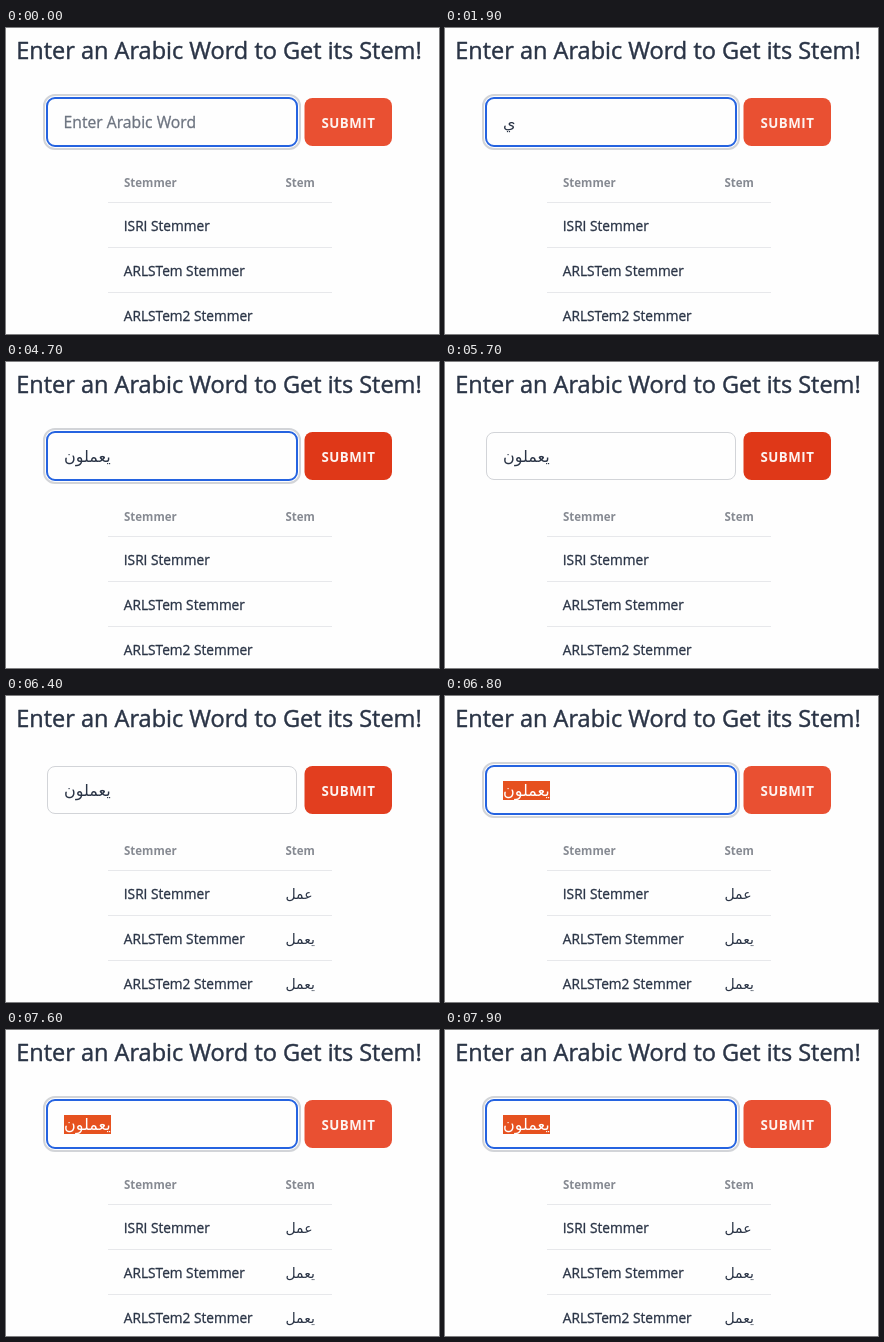
An HTML page with a canvas that plays this animation: 433x306 px, repeating every 8 s.

```html
<!DOCTYPE html>
<html lang="en">
<head>
<meta charset="utf-8">
<title>Arabic stemmer</title>
<style>
  html, body { margin: 0; width: 100%; height: 100%; overflow: hidden; background: #fefefe; }
  canvas { display: block; width: 433px; height: 306px; }
</style>
</head>
<body>
<canvas id="stage"></canvas>
<script>
const W = 433, H = 306, LOOP = 8000, STEP = 100;
const WORD = 'يعملون';
const LATIN = '"Open Sans", "Noto Sans", sans-serif';
const ARABIC = '"DejaVu Sans", sans-serif';
const INK = '#2a3446';

// Time of each keystroke and the number of letters typed by then
const TYPING = [[1900, 1], [2300, 2], [2600, 3], [3000, 4], [3200, 6]];
const HOVER_IN = 4400, BLUR = 5700, RESULTS = 6300, SELECT = 6800;

const ROWS = [
  ['ISRI Stemmer', 'عمل'],
  ['ARLSTem Stemmer', 'يعمل'],
  ['ARLSTem2 Stemmer', 'يعمل']
];

const canvas = document.getElementById('stage');
const ctx = canvas.getContext('2d');
const ratio = window.devicePixelRatio || 1;
canvas.width = W * ratio;
canvas.height = H * ratio;
ctx.scale(ratio, ratio);

// A thin stroke in the text colour makes the letters slightly heavier.
function text(str, x, y, font, color, { spacing = 0, weight = 0 } = {}) {
  ctx.font = font;
  ctx.letterSpacing = spacing + 'px';
  ctx.fillStyle = color;
  ctx.fillText(str, x, y);
  if (weight) {
    ctx.strokeStyle = color;
    ctx.lineWidth = weight;
    ctx.lineJoin = 'round';
    ctx.strokeText(str, x, y);
  }
}

function roundRect(x, y, w, h, r) {
  ctx.beginPath();
  ctx.roundRect(x, y, w, h, r);
}

function outline(x, y, w, h, r, color, width) {
  roundRect(x, y, w, h, r);
  ctx.strokeStyle = color;
  ctx.lineWidth = width;
  ctx.stroke();
}

const smooth = p => {
  p = Math.min(1, Math.max(0, p));
  return p * p * (3 - 2 * p);
};

const mix = (a, b, p) => `rgb(${a.map((v, i) => Math.round(v + (b[i] - v) * p))})`;

function drawInput(t) {
  const focused = t < BLUR || t >= SELECT;
  if (focused) {
    outline(38, 67, 256, 54, 11, '#d2d4d8', 2);
    outline(41, 70, 250, 48, 8, '#2563e0', 2);
  } else {
    outline(41.5, 70.5, 249, 47, 7.5, '#d2d4d8', 1);
  }

  const letters = TYPING.reduce((n, [at, count]) => t >= at ? count : n, 0);
  if (!letters) {
    text('Enter Arabic Word', 57.6, 100, '15.7px ' + LATIN, '#6d7480', { weight: 0.3 });
    return;
  }
  const selected = t >= SELECT;
  if (selected) {
    ctx.fillStyle = '#e6511f';
    ctx.fillRect(58, 85, 47, 19);
  }
  text(WORD.slice(0, letters), 58, 100, '16px ' + ARABIC, selected ? '#fff' : INK);
}

function drawButton(t) {
  const hover = smooth((t - HOVER_IN + STEP) / 400) - smooth((t - RESULTS) / 300);
  ctx.fillStyle = mix([233, 80, 50], [223, 56, 24], hover);
  roundRect(298.5, 70, 87.5, 48, 8);
  ctx.fill();
  text('SUBMIT', 315.5, 99.6, 'bold 13.3px ' + LATIN, '#fdf3f0', { spacing: 0.5 });
}

function drawTable(t) {
  const head = 'bold 11.5px ' + LATIN;
  text('Stemmer', 118, 159, head, '#868a92');
  text('Stem', 279.5, 159, head, '#868a92');
  ROWS.forEach(([name, stem], i) => {
    const y = 174 + i * 45;
    ctx.fillStyle = '#e7e8eb';
    ctx.fillRect(102, y, 224, 1);
    text(name, 117.8, y + 29, '13.7px ' + LATIN, INK, { weight: 0.3 });
    if (t >= RESULTS) text(stem, 279.5, y + 29, '14px ' + ARABIC, INK);
  });
}

function draw(now) {
  const t = Math.floor((now % LOOP) / STEP) * STEP;
  ctx.fillStyle = '#fefefe';
  ctx.fillRect(0, 0, W, H);
  text('Enter an Arabic Word to Get its Stem!', 10.3, 31, '23.5px ' + LATIN, INK, { weight: 0.45 });
  drawInput(t);
  drawButton(t);
  drawTable(t);
}

let start;
function tick(now) {
  start ??= now;
  draw(now - start);
  requestAnimationFrame(tick);
}
requestAnimationFrame(tick);
</script>
</body>
</html>
```
